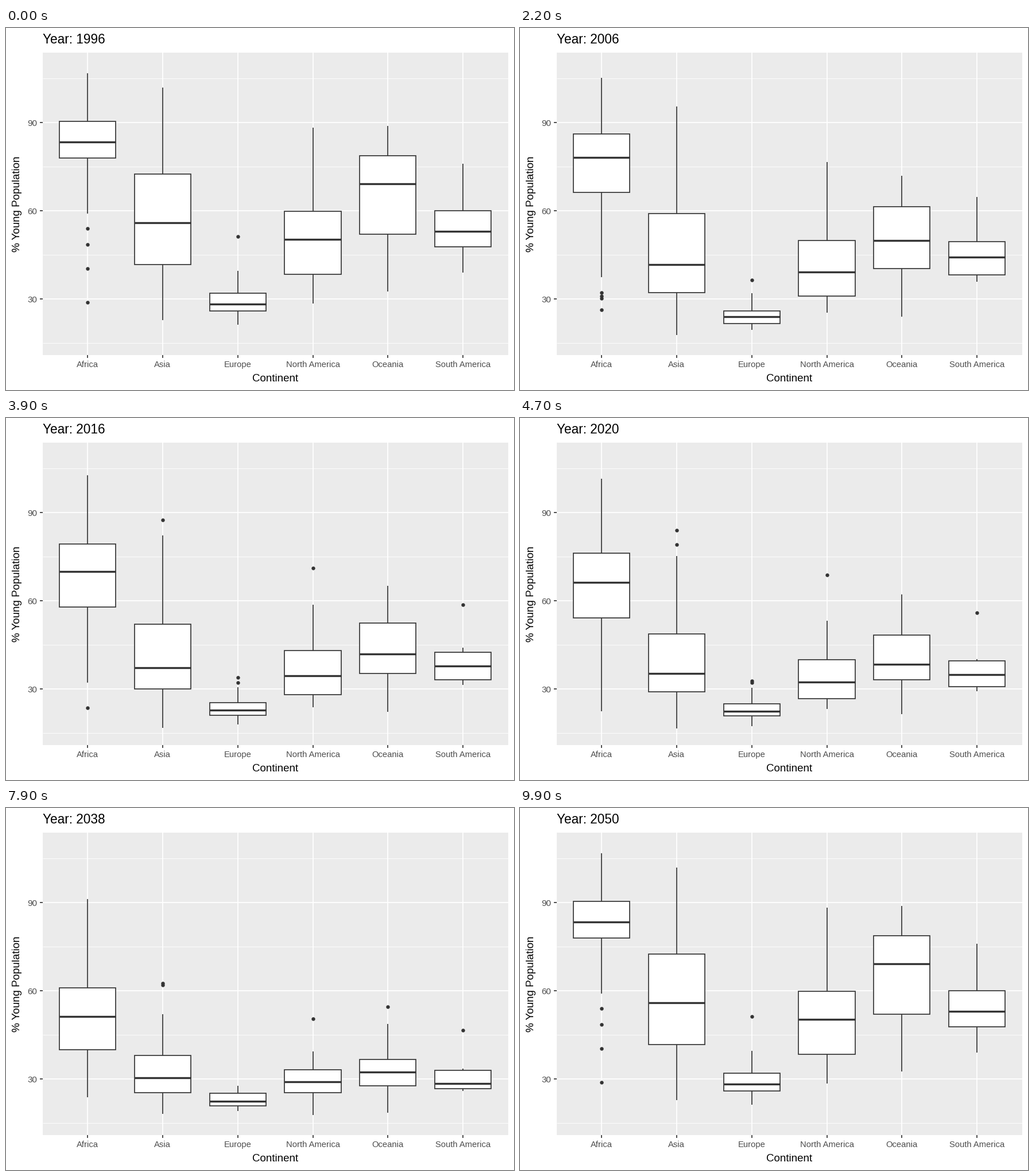
A matplotlib script for the animation above (10 s loop, 885 px wide and 632 px high).

```python
import numpy as np
import matplotlib.pyplot as plt
from matplotlib.animation import FuncAnimation
from matplotlib.patches import Rectangle

W, H, DPI = 885, 632, 64
PT = 72 / DPI  # points per pixel
INK, LABEL, GRID = "#333333", "#4D4D4D", "white"
LEFT, RIGHT, TOP, BOTTOM = 63.6, 874.6, 43, 571.4
STEP = (RIGHT - LEFT) / 6.2
HALF = 0.375 * STEP
THIN, LINE = 0.9, 1.7
STATES = 28
KEYS = (0, 5.5, 12, 21)  # states at which the curves are given

plt.rcParams["font.family"] = "Liberation Sans"
fig = plt.figure(figsize=(W / DPI, H / DPI), dpi=DPI, facecolor="white")
ax = fig.add_axes([0, 0, 1, 1])
ax.set_xlim(0, W)
ax.set_ylim(H, 0)
ax.axis("off")


def ypix(v):
    return 627.1 - np.asarray(v) * 154 / 30


def xpix(i):
    return LEFT + STEP * (0.6 + i)


def line(x, y, color, width, z):
    return ax.plot(x, y, color=color, lw=width * PT, zorder=z,
                   solid_capstyle="butt")[0]


def text(x, y, s, size, color="black", ha="center", **kw):
    return ax.text(x, y, s, fontsize=size * PT, color=color, ha=ha,
                   va="baseline", **kw)


def curve(values, k):
    """Follow the key values, then flatten out past the last key."""
    drift = max(k - KEYS[-1], 0) * (values[-1] - values[-2]) / 12
    return np.interp(k, KEYS[:len(values)], values) + drift


class Box:
    """Quartile curves plus the extreme points that set whiskers and dots."""

    def __init__(self, i, q1, med, q3, low, high):
        self.quartiles, self.extremes = (q1, med, q3), low + high
        self.x = xpix(i)
        self.upper = line([], [], INK, LINE, 4)
        self.lower = line([], [], INK, LINE, 4)
        self.body = ax.add_patch(Rectangle(
            (self.x - HALF, 0), 2 * HALF, 0, fc="white", ec=INK,
            lw=LINE * PT, joinstyle="miter", zorder=5))
        self.mid = line([], [], INK, 2 * LINE, 6)
        self.dots, = ax.plot([], [], "o", color=INK, ms=6.4 * PT, mew=0,
                             zorder=4, snap=False)

    def show(self, k):
        q1, med, q3 = (curve(q, k) for q in self.quartiles)
        reach = 1.5 * (q3 - q1)
        points = [curve(p, k) for p in self.extremes]
        inside = [p for p in points if q1 - reach <= p <= q3 + reach]
        outside = [p for p in points if p not in inside]
        lo, hi = min(inside + [q1]), max(inside + [q3])

        x = self.x
        self.upper.set_data([x, x], ypix([hi, q3]))
        self.lower.set_data([x, x], ypix([q1, lo]))
        self.body.set_y(ypix(q3))
        self.body.set_height(ypix(q1) - ypix(q3))
        self.mid.set_data([x - HALF, x + HALF], ypix([med, med]))
        self.dots.set_data([x] * len(outside), ypix(outside))


# Panel, grid and axes
ax.add_patch(Rectangle((LEFT, TOP), RIGHT - LEFT, BOTTOM - TOP,
                       fc="#EBEBEB", ec="none", zorder=0))
for v in range(15, 106, 15):
    y, major = ypix(v), v % 30 == 0
    line([LEFT, RIGHT], [y, y], GRID, LINE if major else THIN, 1 + major)
    if major:
        line([LEFT - 5, LEFT], [y, y], INK, LINE, 2)
        text(54.5, y + 6, str(v), 15.1, LABEL, "right")
NAMES = ("Africa", "Asia", "Europe", "North America", "Oceania",
         "South America")
for i, name in enumerate(NAMES):
    x = xpix(i)
    line([x, x], [TOP, BOTTOM], GRID, LINE, 2)
    line([x, x], [BOTTOM, BOTTOM + 5], INK, LINE, 2)
    text(x, 592, name, 14.8, LABEL)
text(469.5, 617.2, "Continent", 18.8)
text(24.2, 307.7, "% Young Population", 18.75, rotation=90,
     rotation_mode="anchor")
title = text(64, 27.2, "", 22.6, ha="left")

boxes = [
    Box(0, q1=(77.9, 66.2, 54.2, 39.9),
        med=(83.4, 78.2, 66.2, 51.3),
        q3=(90.5, 86.2, 76.2, 60.9),
        low=[(59.1, 37.4), (54, 32.2, 34), (48.5, 31, 34), (40.4, 30.3, 33),
             (28.9, 26.3, 22.5, 23.7)],
        high=[(106.8, 105.3, 101.5, 91.2)]),
    Box(1, q1=(41.7, 32.2, 29, 25.3),
        med=(56, 41.8, 35.2, 30.5),
        q3=(72.5, 59.1, 48.8, 38.1),
        low=[(22.8, 17.7, 16.5, 18.1)],
        high=[(102, 95.4, 84, 62.6), (95, 89, 79.2, 62),
              (90, 84, 75.2, 52.1)]),
    Box(2, q1=(25.9, 21.7, 20.9, 20.9),
        med=(28.3, 24, 22.4, 22.5),
        q3=(32, 26, 25, 25.1),
        low=[(21.3, 19.5, 17.3, 19.1)],
        high=[(51.2, 36.4, 32.7, 27.7), (39.5, 32, 32.1, 27.6),
              (38, 30.8, 30.4, 27.5)]),
    Box(3, q1=(38.4, 30.9, 26.8, 25.4),
        med=(50.3, 39.2, 32.3, 29),
        q3=(59.9, 49.9, 39.9, 33.2),
        low=[(28.5, 25.3, 23.2, 17.8)],
        high=[(88.2, 76.6, 68.8, 50.4), (80, 71, 53.2, 39.3)]),
    Box(4, q1=(52, 40.3, 33.1, 27.6),
        med=(69.2, 49.8, 38.3, 32.3),
        q3=(78.8, 61.4, 48.4, 36.7),
        low=[(32.6, 23.9, 21.5, 18.6)],
        high=[(88.9, 72, 62.1, 54.5), (85, 70, 60, 48.7)]),
    Box(5, q1=(47.7, 38.2, 30.8, 26.7),
        med=(53, 44.3, 34.8, 28.5),
        q3=(60, 49.5, 39.5, 33),
        low=[(39, 35.8, 29.3, 25.9)],
        high=[(76, 64.7, 56, 46.6), (70, 53, 40.2, 33.5)]),
]


def schedule():
    """Hold each state, with one halfway step to the next."""
    steps = []
    for s in range(STATES):
        hold = 2 if s == 0 or s >= 18 else 3
        steps += [(s, s)] * hold
        if s == STATES - 1:
            steps.append((0, s))
        elif s != 12:
            steps.append((s + 0.5, s))
    return steps


STEPS = schedule()


def draw(n):
    k, state = STEPS[n]
    title.set_text(f"Year: {1996 + 2 * state}")
    for box in boxes:
        box.show(k)
    return []


anim = FuncAnimation(fig, draw, frames=len(STEPS), interval=100, repeat=True,
                     repeat_delay=0, blit=False)
plt.show()
```
